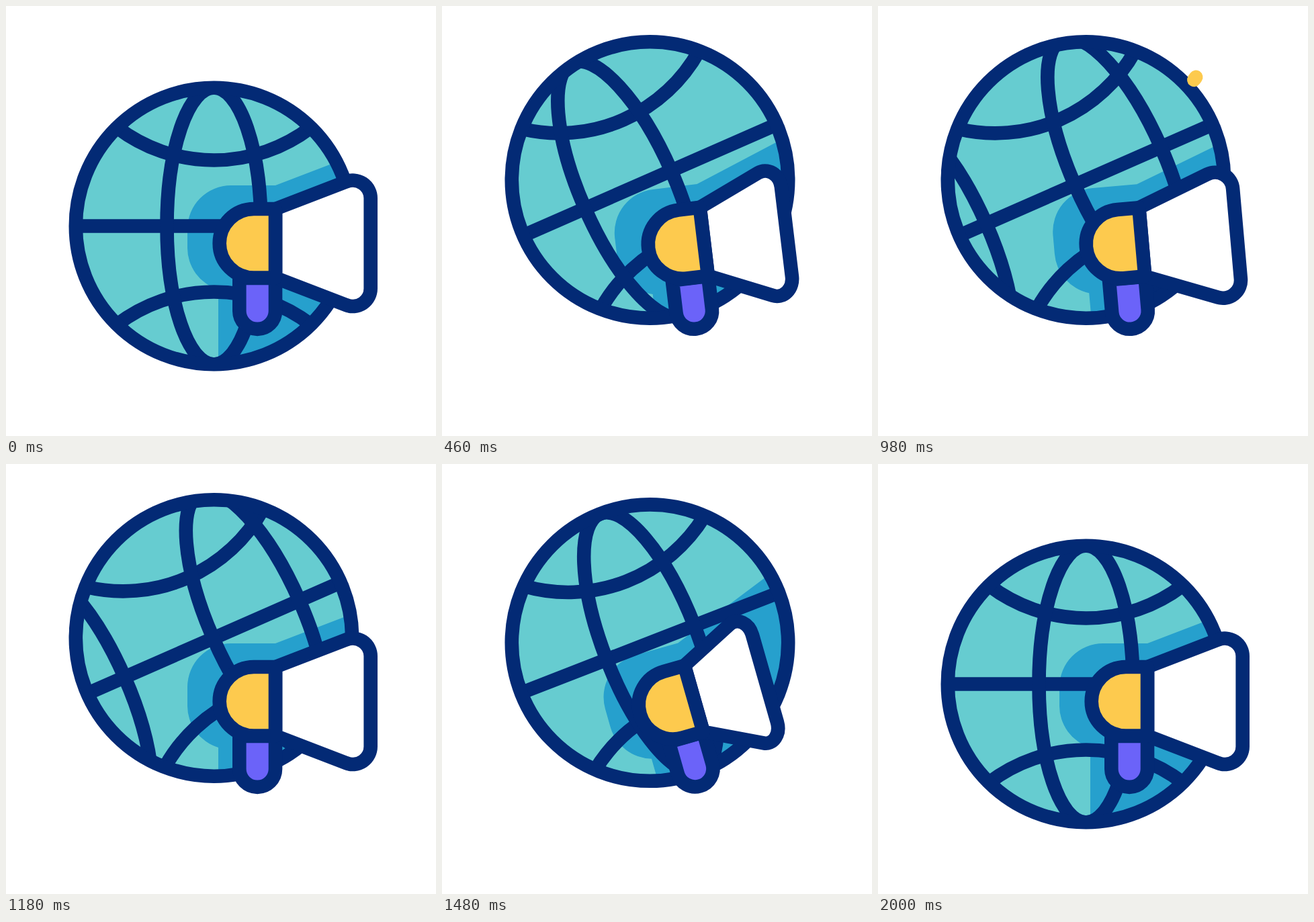
Animation of 640 by 640 pixels, one loop 2220 ms. Source, as an HTML page:

```html
<!DOCTYPE html>
<html>
<head>
<meta charset="utf-8">
<style>
html, body { margin: 0; width: 100%; height: 100%; overflow: hidden; background: #fff; }
svg { display: block; width: 100%; height: 100%; }
.line { fill: none; stroke: #032a75; stroke-width: 20.6; stroke-linejoin: round; }
</style>
</head>
<body>
<svg viewBox="0 0 640 640">
  <clipPath id="disc"><circle r="215"/></clipPath>
  <g id="globe">
    <g clip-path="url(#disc)">
      <circle r="206" fill="#66ccd0"/>
      <path id="shade" fill="#26a0cd" d="M800 114L401 267H335A65 65 0 0 0 270 332V359A65 65 0 0 0 316 422V800H800Z"/>
      <g id="grid" class="line">
        <path d="M-206 0H206M-144 -146.5A238 238 0 0 0 144 -146.5M-144 146.5A238 238 0 0 1 144 146.5"/>
        <g id="meridians">
          <ellipse rx="70" ry="206"/>
          <ellipse cx="-284" rx="70" ry="206"/>
        </g>
      </g>
    </g>
    <circle class="line" r="205.7"/>
    <path id="wave" fill="none" stroke="#fdca4e" stroke-width="20.6" stroke-linecap="round"/>
  </g>
  <g id="phone" class="line">
    <path fill="#6b63f9" d="M347.3 405V454A26.8 26.8 0 0 0 401 454V405Z"/>
    <path id="horn" fill="#fff"/>
    <path fill="#fdca4e" d="M401 302H369A51.3 51.3 0 0 0 369 404.6H401Z"/>
  </g>
</svg>
<script>
const $ = id => document.getElementById(id);
const set = (id, name, value) => $(id).setAttribute(name, value);
const LOOP = 2220, STEP = 20;
const TILT = 23.7, RISE = 68.5, SWING = 20.3, SQUASH = 0.228;

// Eased value at time t through [time, value] keys
function track(t, ...keys) {
  if (t <= keys[0][0]) return keys[0][1];
  for (let i = 1; i < keys.length; i++) {
    const [t0, a] = keys[i - 1], [t1, b] = keys[i];
    if (t < t1) {
      const s = (t - t0) / (t1 - t0);
      return a + (b - a) * s * s * (3 - 2 * s);
    }
  }
  return keys[keys.length - 1][1];
}

function hornPath(k) {
  const x = v => 401 + (v - 401) * k;
  const arc = `A${26.5 * k} 26.5 0 0 1 `;
  return `M401 302L${x(506.5)} 261.4${arc}${x(542.7)} 286V420.6${arc}${x(506.5)} 445.2L401 404.6Z`;
}

function wavePath(from, to) {
  if (to <= 0 || from >= 1) return '';
  const R = 400;
  const point = f => {
    const a = (f * 2 - 1) * 0.557;
    return `${R * Math.sin(a)} ${R * Math.cos(a) - 414}`;
  };
  return `M${point(from)}A${R} ${R} 0 0 0 ${point(to)}`;
}

function draw(t) {
  const lift = track(t, [0, 0], [400, 1], [1400, 1], [1800, 0]);
  const spin = track(t, [0, 0], [300, -45], [1200, 69], [1500, 0]);
  const swing = SWING * track(t, [300, 0], [710, 1], [1110, 0], [1200, 0], [1600, 1], [2000, 0]);
  const squash = track(t, [300, 0], [600, 1], [700, 0], [1200, 0], [1500, 1], [1600, 0]);
  const y = 327.5 - RISE * lift;
  const tilt = `rotate(${-TILT * lift})`;
  const turn = `rotate(${-swing} 374 445)`;

  set('globe', 'transform', `translate(309.5 ${y})`);
  set('grid', 'transform', tilt);
  set('meridians', 'transform', `translate(${spin})`);
  set('shade', 'transform', `translate(-309.5 ${-y}) ${turn}`);
  set('phone', 'transform', turn);
  set('horn', 'd', hornPath(1 - SQUASH * squash));
  set('wave', 'transform', tilt);
  set('wave', 'd', wavePath(track(t, [605, 0], [1005, 1]), track(t, [510, 0], [910, 1])));
}

const start = performance.now();
function tick() {
  const t = (performance.now() - start) % LOOP;
  draw(Math.floor(t / STEP) * STEP);
  requestAnimationFrame(tick);
}
tick();
</script>
</body>
</html>
```
